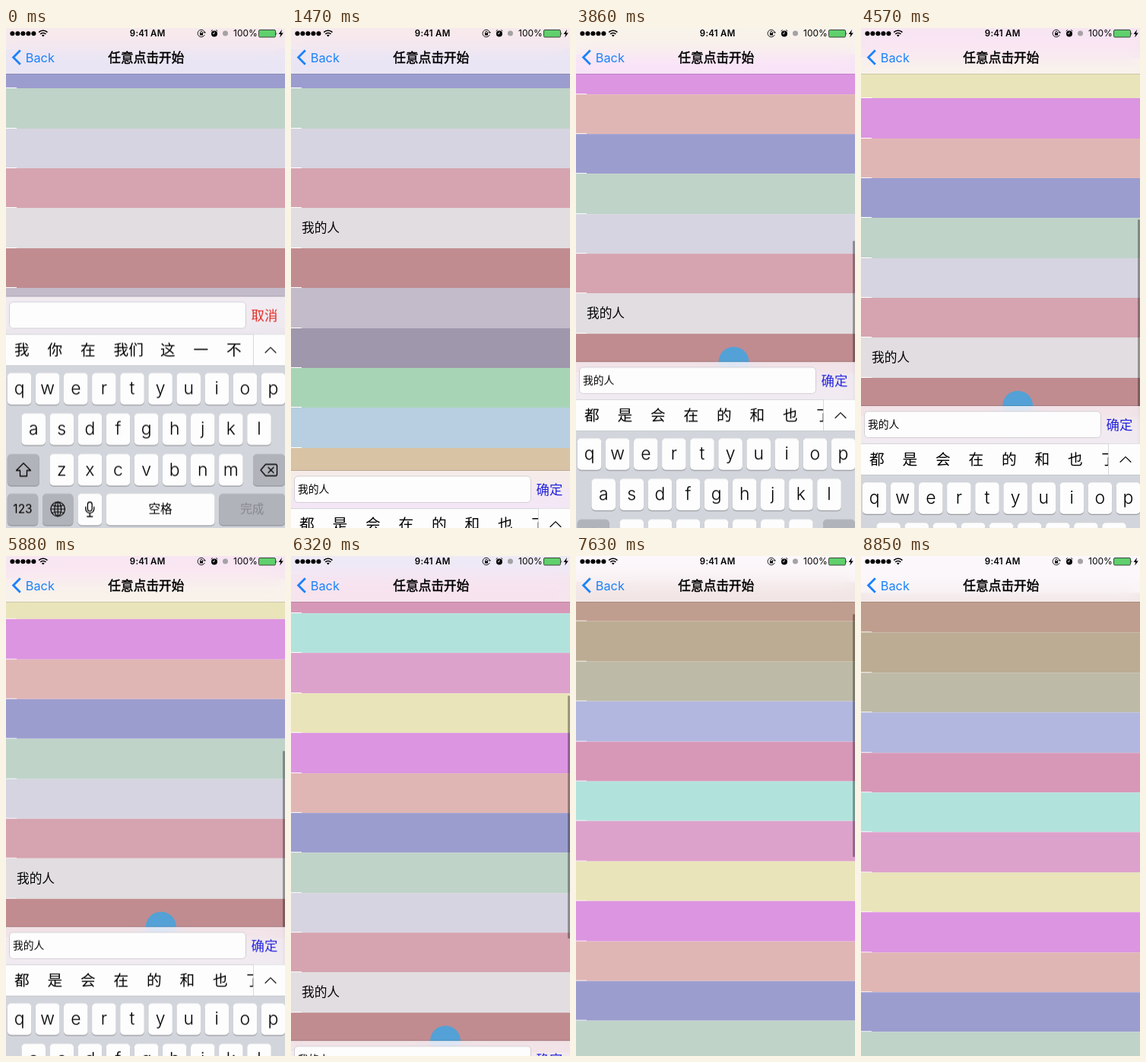
Write an HTML page that moves like this. It is 367 by 656 pixels and loops after 9.11 s.

```html
<!DOCTYPE html>
<html lang="zh">
<head>
<meta charset="utf-8">
<style>
html, body { margin: 0; width: 100%; height: 100%; overflow: hidden; background: #fff; }
#stage { position: relative; width: 367px; height: 656px; overflow: hidden; background: #fff;
  font-family: Inter, "Noto Sans CJK SC", "Noto Sans CJK", sans-serif; }
#stage > * { position: absolute; left: 0; top: 0; }
svg { display: block; }
#list { width: 367px; }
.row { position: relative; height: 52.4px; font-size: 16.7px; line-height: 52.4px; text-indent: 14px; }
.row::after { content: ""; position: absolute; left: 0; bottom: 0; width: 14px; height: 1px; background: #fff; }
#dot { width: 40px; height: 40px; margin: -20px; border-radius: 50%; background: #53a1d6; }
#ring { left: 235px !important; top: 263px !important; width: 49px; height: 49px; margin: -28px;
  border: 3.5px solid #d6d2e4; border-radius: 50%; }
#thumb { left: 364px !important; width: 2.6px; height: 319px; border-radius: 2px; background: rgba(0,0,0,.34); }
.glass { backdrop-filter: blur(13px) saturate(1.5); background: rgba(251,246,249,.82); }
#nav { width: 367px; height: 60px; box-shadow: 0 .5px rgba(0,0,0,.25); }
#panel { width: 367px; height: 304px; box-shadow: 0 -.5px rgba(0,0,0,.25); }
.mid { text-anchor: middle; }
.line { fill: none; stroke: #000; stroke-linejoin: round; stroke-linecap: round; }
</style>
</head>
<body>
<div id="stage">
  <div id="list"></div>
  <div id="dot"></div>
  <div id="ring"></div>
  <div id="thumb"></div>
  <div id="nav" class="glass"></div>
  <div id="panel" class="glass"></div>
</div>
<script>
const $ = id => document.getElementById(id);
const LOOP = 9110, LIST_TOP = 48.3, MAX_SCROLL = 545.3;
const BAR_UP = 352.5, BAR_DOWN = 658, GRAB = 2950, RELEASE = 6360, FINGER_START = 326;

const colors = ("c09e8f bbac93 bdbaa7 b2b7df d798b7 b2e2dc dda2cc e9e4b9 dc95e1 e0b6b4 9c9dcf " +
  "bfd3c8 d6d4e0 d5a4b0 e1dde0 c08c90 c3bbc9 9f97ab a8d4b6 b7cfe0 d9c3a5 c9a9d6").split(" ");
$("list").innerHTML = colors.map(c => `<div class="row" style="background:#${c}"></div>`).join("");
const cell = $("list").children[14];

const text = (x, y, size, s, more = "") => `<text x="${x}" y="${y}" font-size="${size}" ${more}>${s}</text>`;
const path = (d, width = 1.3, style = "") =>
  `<path class="line" d="${d}" style="stroke-width:${width};${style}"/>`;

function navArt() {
  let s = "";
  for (let i = 0; i < 5; i++) s += `<circle cx="${8.4 + i * 7}" cy="7.3" r="3"/>`;
  s += path("M43.2 5.6a8 8 0 0 1 11.2 0M45.2 8a5 5 0 0 1 7.2 0", 1.6, "stroke-linecap:butt")
    + `<path d="M46.9 9.6a2.8 2.8 0 0 1 3.8 0l-1.9 2z"/>`
    + text(186.2, 11.3, 11.5, "9:41 AM", 'class="mid" font-weight="600" letter-spacing=".25"')
    + path("M261.2 9.3a4.8 4.8 0 1 1 .4-3.4M259.8 6h2.6", .9)
    + path("M255.6 6.8v-1a1.4 1.4 0 0 1 2.8 0v1", .8)
    + `<rect x="255" y="6.6" width="4" height="3"/>`
    + `<circle cx="274" cy="7.4" r="4"/>` + path("M270 3.8l1.3-1.1M278 3.8l-1.3-1.1", 1)
    + path("M274 5.2v2.4h-1.8", .8, "stroke:#fff")
    + `<circle cx="288.5" cy="7" r="3.5" fill="#a5a2a6"/>`
    + text(299, 11.3, 12, "100%")
    + `<rect x="332.5" y="2.5" width="22" height="9.5" rx="1.5" fill="#5fd06c" stroke="#333" stroke-width=".9"/>`
    + `<path d="M355.6 5.4q1.6 1.8 0 3.8z"/><path d="M363 2l-4.4 6h2.6l-1 4.6 4.6-6.2h-2.8z"/>`
    + path("M18.8 29.2l-9.2 9.3 9.2 9.3", 2.8, "stroke:#1a82fb;stroke-linejoin:miter;stroke-linecap:butt")
    + text(25.8, 44.6, 16.3, "Back", 'fill="#1a82fb"')
    + text(184.4, 44.6, 16.7, "任意点击开始", 'class="mid" stroke="#000" stroke-width=".5"');
  return `<svg width="367" height="60">${s}</svg>`;
}

function key(x, y, w, label = "", size = 23, dark = false, more = "") {
  return `<rect x="${x}" y="${y + 1}" width="${w}" height="41.5" rx="5" fill="#888a8f"/>`
    + `<rect x="${x}" y="${y}" width="${w}" height="41.5" rx="5" fill="${dark ? "#b1b3ba" : "#fdfdfd"}"/>`
    + text(x + w / 2, y + 20.5 + size * .33, size, label, `class="mid" ${more}`);
}

function panelArt() {
  let s = `<rect x="4.5" y="7" width="311" height="34.5" rx="5" fill="#fdfdfd" stroke="#c9c6cc" stroke-width=".8"/>`
    + text(9, 28.8, 13.8, "", 'id="field"') + text(322.5, 31.2, 17.4, "", 'id="action"')
    + `<rect y="49.2" width="367" height="41" fill="#fdfdfd"/><rect y="49" width="367" height=".7" fill="#c6c6ca"/><g id="words"></g>`
    + `<rect x="325.5" y="49.7" width="42" height="40.5" fill="#fdfdfd"/><rect x="325" y="49.7" width=".8" height="40.5" fill="#cfcfd3"/>`
    + path("M341 73.5l7-6.8 7 6.8", 1.1)
    + `<rect y="90" width="367" height="216" fill="#d2d5db"/><rect y="90" width="367" height=".6" fill="#bfc2c7"/>`;
  [["qwertyuiop", 1.8, 100.3], ["asdfghjkl", 20.4, 153.3], ["zxcvbnm", 57.5, 206.5]].forEach(([letters, x, y]) =>
    [...letters].forEach((c, i) => s += key(x + i * 37.1, y, 31.6, c, 23, false, 'font-weight="350"')));
  s += key(1.8, 206.5, 42, "", 1, true) + path("M23 218.5l9.5 9.5h-5v7.5h-9v-7.5h-5z")
    + key(325, 206.5, 42, "", 1, true)
    + path("M335 227.5l6.5-7.5h13q2 0 2 2v11q0 2-2 2h-13zM345 224l7 7M352 224l-7 7")
    + key(1.8, 258.5, 40.4, "123", 15.5, true)
    + key(48, 258.5, 40.4, "", 1, true)
    + `<g class="line" stroke-width="1.1"><circle cx="68.2" cy="278.7" r="9.3"/><ellipse cx="68.2" cy="278.7" rx="4.4" ry="9.3"/>`
    + `<path d="M68.2 269.4v18.6M58.9 278.7h18.6M60.5 273.6q7.7 3 15.4 0M60.5 283.8q7.7-3 15.4 0"/></g>`
    + key(94.5, 258.5, 31.6)
    + path("M110.3 269.5a2.9 2.9 0 0 1 2.9 2.9v6a2.9 2.9 0 0 1-5.8 0v-6a2.9 2.9 0 0 1 2.9-2.9z"
      + "M104.8 276v2.5a5.5 5.5 0 0 0 11 0v-2.5M110.3 284v4.5M106.8 288.5h7")
    + key(131.6, 258.5, 143, "空格", 15.6)
    + key(280.3, 258.5, 87, "完成", 15.6, true, 'id="done"');
  return `<svg width="367" height="304">${s}</svg>`;
}

$("nav").innerHTML = navArt();
$("panel").innerHTML = panelArt();

const suggestions = ["我 你 在 我们 这 一 不", "的 们 是 也 在 不 就 会",
  "人 心 家 手 是 我 爱 话", "都 是 会 在 的 和 也 了"].map(line => {
  let x = 11;
  return line.split(" ").map(w => {
    const t = text(x, 76.8, 19.7, w);
    x += 43.5 + 18 * (w.length - 1);
    return t;
  }).join("");
});

// Time and height of the dragging finger
const drag = [[GRAB, FINGER_START], [3240, 372], [3510, 372], [3860, 438], [4250, 484], [4570, 496],
  [4900, 468], [5270, 425], [5540, 425], [5880, 486.5], [RELEASE, 649.7]];
const slopes = drag.slice(1).map(([t, y], i) => (y - drag[i][1]) / (t - drag[i][0]));
const tangent = i => {
  const a = slopes[Math.max(i - 1, 0)], b = slopes[Math.min(i, slopes.length - 1)];
  return a * b <= 0 ? 0 : 2 * a * b / (a + b);
};

function finger(t) {
  let i = 0;
  while (i < drag.length - 2 && t > drag[i + 1][0]) i++;
  const [t0, y0] = drag[i], [t1, y1] = drag[i + 1], h = t1 - t0, u = (t - t0) / h, v = 1 - u;
  return y0 * (1 + 2 * u) * v * v + y1 * (3 - 2 * u) * u * u
    + h * u * v * (tangent(i) * v - tangent(i + 1) * u);
}

function scrollAt(t) {
  if (t < GRAB) return MAX_SCROLL;
  if (t < RELEASE) return MAX_SCROLL + FINGER_START - finger(t);
  return Math.max(0, 86 * Math.exp((6840 - t) / 500) - 3);
}

const easeOut = (t, start, span) => 1 - (1 - Math.min(1, Math.max(0, (t - start) / span))) ** 3;

function barAt(t, y) {
  if (t >= GRAB) return Math.min(BAR_DOWN, Math.max(BAR_UP, y));
  const hidden = t < 2200 ? easeOut(t, 1250, 600) : 1 - easeOut(t, 2514, 400);
  return BAR_UP + (BAR_DOWN - BAR_UP) * hidden;
}

// Index of the current stage among ascending times
const stageOf = (t, ...times) => times.filter(x => t >= x).length;
const move = (el, x, y) => el.style.transform = `translate(${x}px,${y}px)`;
const show = (el, opacity) => el.style.opacity = opacity;
let shown = -1;

function frame() {
  const t = performance.now() % LOOP;
  const scroll = scrollAt(t), y = MAX_SCROLL + FINGER_START - scroll;
  move($("list"), 0, LIST_TOP - scroll);
  move($("panel"), 0, barAt(t, y));
  move($("thumb"), 0, 69 + .485 * scroll);
  show($("thumb"), t > GRAB && t < 8420 ? 1 : 0);

  const tapping = t >= 2180 && t < 2450, dragging = t >= GRAB && t < RELEASE;
  show($("dot"), tapping || dragging ? 1 : 0);
  if (tapping) move($("dot"), 235, 263);
  else move($("dot"), 207.5 - (t - 3860) * .0018, y);
  show($("ring"), t >= 2450 && t < 2750 ? .6 : 0);

  cell.textContent = t >= 1130 ? "我的人" : "";
  $("field").textContent = "我的人".slice(0, stageOf(t, 80, 430, 860));
  const confirm = t >= 430;
  $("action").textContent = confirm ? "确定" : "取消";
  $("action").setAttribute("fill", confirm ? "#2222dd" : "#e0261c");
  $("done").setAttribute("fill", t < 80 ? "#85878d" : "#000");
  const set = stageOf(t, 170, 430, 860);
  if (set !== shown) $("words").innerHTML = suggestions[shown = set];
  requestAnimationFrame(frame);
}
frame();
</script>
</body>
</html>
```
